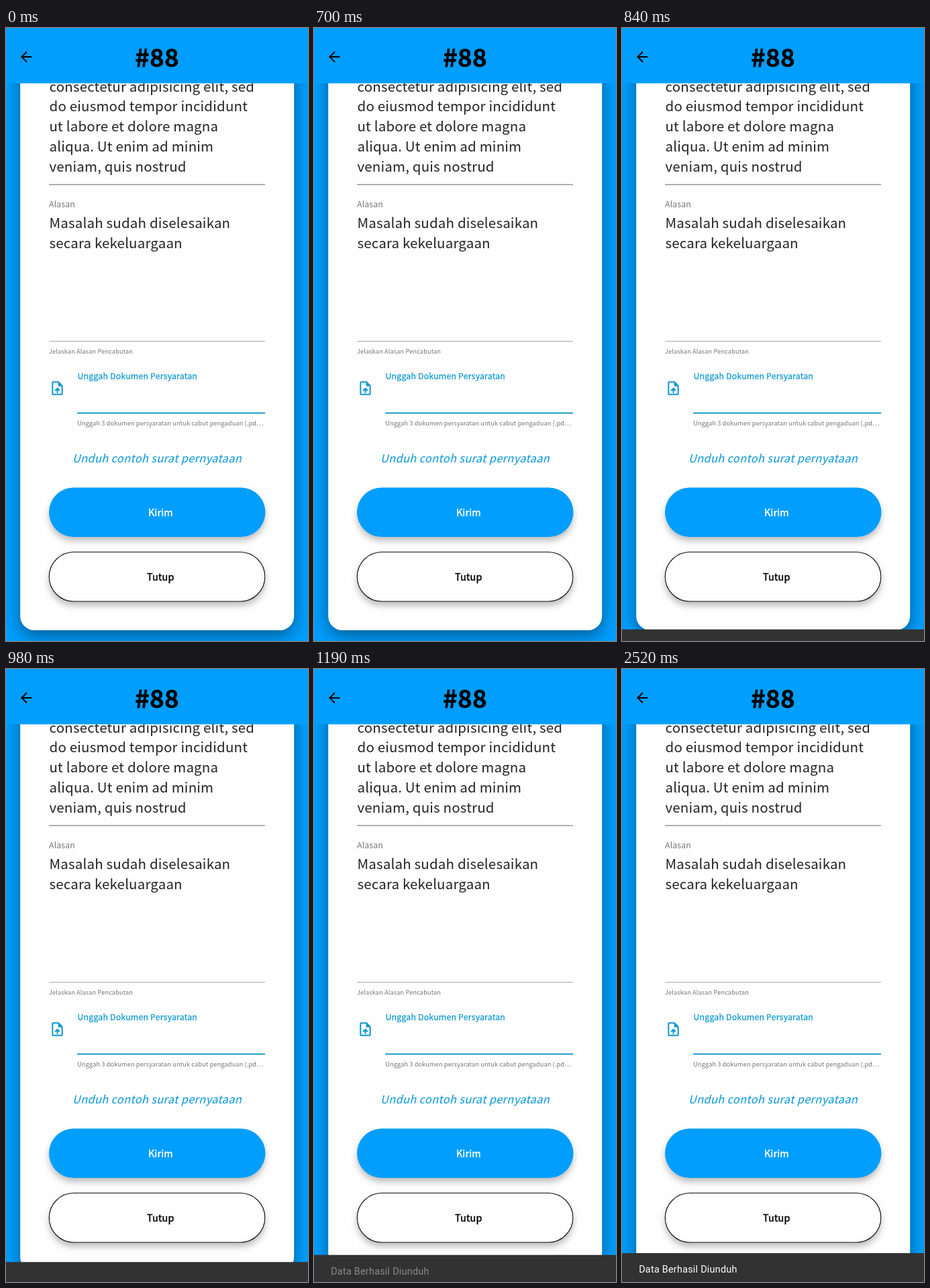
These frames come from a looping animation (450x913 px, 3.64 s). An HTML page:

```html
<!DOCTYPE html>
<html lang="id">
<head>
<meta charset="utf-8">
<title>Cabut pengaduan</title>
<style>
  html, body { margin: 0; height: 100%; overflow: hidden; background: #019efe; }
  svg { display: block; width: 100%; height: 100%; }
  text {
    font-family: "Noto Sans CJK JP", "Noto Sans CJK SC", "Noto Sans CJK", "Noto Sans", sans-serif;
    letter-spacing: .16px;
  }
  .primary { fill: #019efe; }
  .paper { fill: #fefefe; }
  .body { font-size: 20.52px; fill: #242424; }
  .label { font-size: 12.31px; fill: #757575; }
  .helper { font-size: 9.2px; letter-spacing: .13px; fill: #757575; }
  .active { fill: #0f98cf; }
  .focused { letter-spacing: .2px; stroke: #0f98cf; stroke-width: .25px; }
  .link { font-size: 16.42px; letter-spacing: .33px; fill: #0597d8; }
  .button { font-size: 14.36px; text-anchor: middle; stroke-width: .45px; }
  .title { font-size: 36.9px; font-weight: 700; text-anchor: middle; stroke: #000; stroke-width: .5px; }
  .card { filter: drop-shadow(0 8px 12px rgba(0, 0, 0, .42)); }
  .raised { filter: drop-shadow(0 6px 5px rgba(0, 0, 0, .25)); }
  #message { font: 14.36px Roboto, sans-serif; letter-spacing: .256px; fill: #fff; }
</style>
</head>
<body>
<svg viewBox="0 0 450 913" preserveAspectRatio="none">
  <rect class="primary" width="450" height="913"/>
  <rect class="card paper" x="21.2" y="-60" width="408" height="957" rx="21"/>

  <g id="paragraphs" class="body"></g>
  <path d="M64 233.2H386" stroke="#999" stroke-width="1.4"/>
  <text class="label" x="64" y="267.3">Alasan</text>
  <path d="M64 466.6H386" stroke="#b4b4b4" stroke-width="1.2"/>
  <text class="helper" x="64" y="485">Jelaskan Alasan Pencabutan</text>

  <path class="active" transform="translate(64.2 524.2) scale(1.026)" d="M14 2H6c-1.1 0-1.99.9-1.99 2L4 20c0 1.1.89 2 1.99 2H18c1.1 0 2-.9 2-2V8l-6-6zm4 18H6V4h7v5h5v11zM8 15.01l1.41 1.41L11 14.84V19h2v-4.16l1.59 1.59L16 15.01 12.01 11z"/>
  <text class="label active focused" x="106.5" y="522.6">Unggah Dokumen Persyaratan</text>
  <path d="M106 573.4H386" stroke="#1599c8" stroke-width="2"/>
  <text class="helper" x="106.2" y="592.3">Unggah 3 dokumen persyaratan untuk cabut pengaduan (.pd<tspan letter-spacing="1.5">...</tspan></text>
  <text class="link" transform="translate(99 647) skewX(-14)">Unduh contoh surat pernyataan</text>

  <rect class="raised primary" x="64" y="684.5" width="322.5" height="73.5" rx="36.75"/>
  <text class="button" x="230.3" y="727.4" fill="#fff" stroke="#fff">Kirim</text>
  <rect class="raised paper" x="64.3" y="780.5" width="321.5" height="73.5" rx="36.75" stroke="#111" stroke-width="1.1"/>
  <text class="button" x="230.3" y="823" stroke="#000">Tutup</text>

  <rect class="primary" width="450" height="82.4"/>
  <path transform="translate(17.9 30.7) scale(1.026)" d="M20 11H7.83l5.59-5.59L12 4l-8 8 8 8 1.41-1.41L7.83 13H20v-2z"/>
  <text class="title" x="225" y="58">#88</text>

  <g id="snackbar">
    <rect width="450" height="50" fill="#323232"/>
    <text id="message" x="25.2" y="29">Data Berhasil Diunduh</text>
  </g>
</svg>
<script>
  const LOOP = 3640, STEP = 70, BAR_HEIGHT = 43, LINE = 29.7;
  const $ = id => document.getElementById(id);
  const clamp = v => Math.min(1, Math.max(0, v));

  function paragraph(baseline, lines) {
    $('paragraphs').innerHTML += lines.map((line, i) =>
      `<text x="64.5" y="${baseline + i * LINE}">${line}</text>`).join('');
  }
  paragraph(94.7, [
    'consectetur adipisicing elit, sed',
    'do eiusmod tempor incididunt',
    'ut labore et dolore magna',
    'aliqua. Ut enim ad minim',
    'veniam, quis nostrud'
  ]);
  paragraph(298, ['Masalah sudah diselesaikan', 'secara kekeluargaan']);

  const start = performance.now();
  function draw() {
    const elapsed = performance.now() - start;
    const t = Math.floor(elapsed % LOOP / STEP) * STEP;
    const rise = 1 - (1 - clamp((t - 700) / 700)) ** 2.3;
    $('snackbar').setAttribute('transform', `translate(0 ${913 - BAR_HEIGHT * rise})`);
    $('message').setAttribute('opacity', clamp((t - 1085) / 245));
    requestAnimationFrame(draw);
  }
  draw();
</script>
</body>
</html>
```
